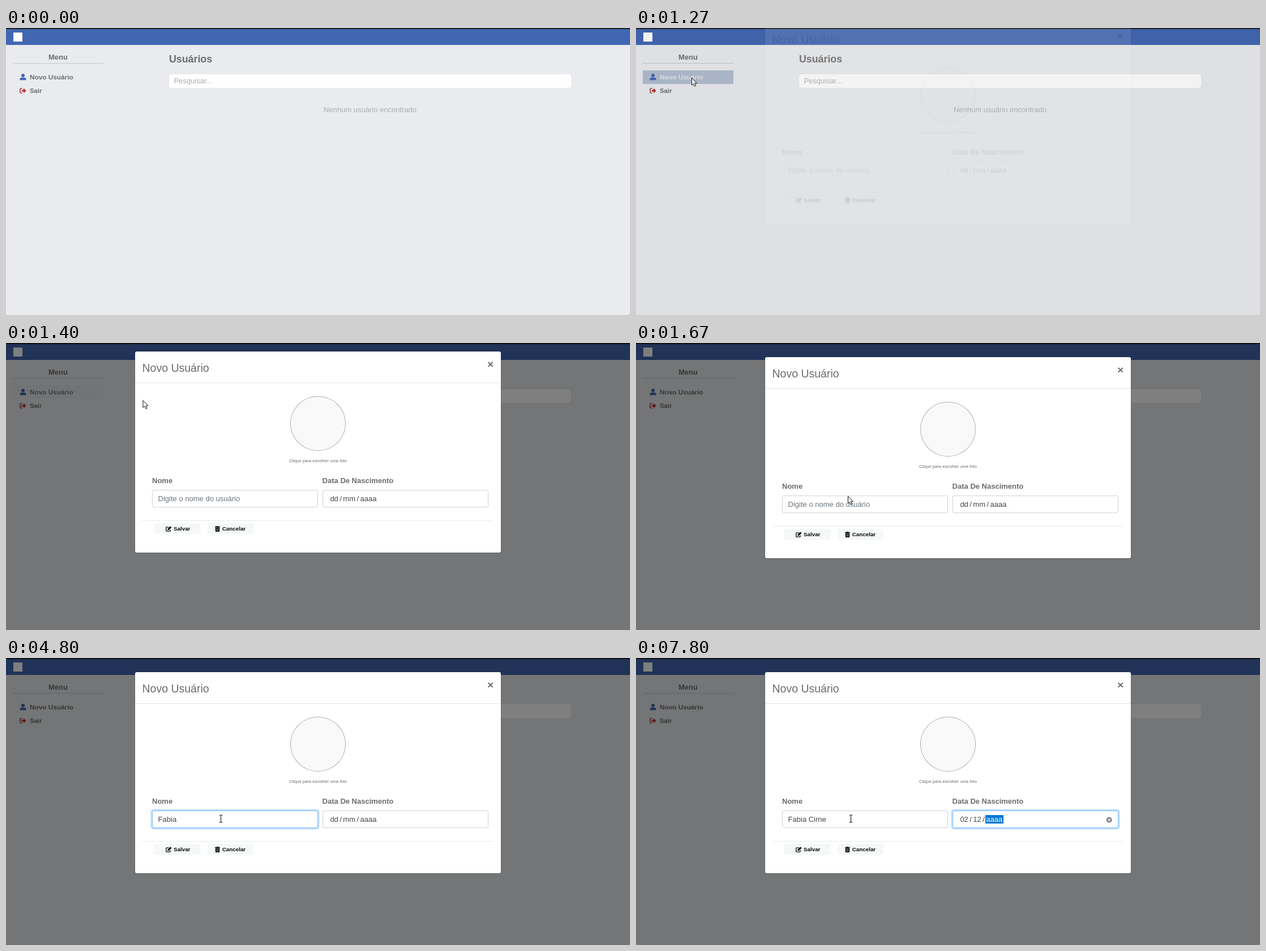
Recreate the animation shown at these times as an HTML page. Size 1102 by 508 pixels, loop 8 s.

```html
<!DOCTYPE html>
<html lang="pt-BR">
<head>
<meta charset="utf-8">
<title>Usuários</title>
<style>
  html, body { margin: 0; width: 100%; height: 100%; overflow: hidden; background: #e9ebee; }
  body { position: relative; font: 13px/16px "Liberation Sans", Arial, sans-serif; color: #6c6c6c; }
  body *, .layer { position: absolute; box-sizing: border-box; white-space: pre; }
  .layer { inset: 0; }
  b { font-weight: bold; }
  svg { overflow: visible; }
  svg * { position: static; }
  #topbar { left: 0; right: 0; top: 0; height: 30px; background: #4267b2; border-top: 2px solid #1e1f25; }
  #logo { left: 13px; top: 8px; width: 16px; height: 16px; background: #fff; }
  #menu { left: 12px; top: 44px; width: 160px; height: 19px; border-bottom: 1px solid #c6c7ca; text-align: center; }
  .row { --h: 0; left: 12px; width: 160px; height: 24px; background: rgb(166 180 204 / var(--h)); }
  .row b { left: 30px; top: 4px; font-size: 11.8px; color: color-mix(in srgb, #fff calc(var(--h) * 100%), #6c6c6c); }
  .row svg { left: 12px; top: 6px; }
  #search { left: 288px; top: 82px; width: 710px; height: 24px; border-radius: 5px; background: #fff; padding: 4px 8.4px; color: #adadad; }
  #empty { left: 288px; top: 137px; width: 710px; text-align: center; color: #adadad; }
  #backdrop { background: #000; }
  #panel { left: 228px; top: 25px; width: 646px; height: 356px; border-radius: 3px; background: #fff; box-shadow: 0 0 0 1px rgb(0 0 0 / .2); }
  .rule { height: 1px; background: #e3e5e8; }
  #photo { left: 502px; top: 104px; width: 98px; height: 97px; border: 1px solid #b0b0b0; border-radius: 50%; background: #f9f9f9; }
  .field { --g: 0; top: 270px; width: 293px; height: 31px; border-radius: 3px; background: #fff; color: #41464c;
    border: 1px solid color-mix(in srgb, #80bdff calc(var(--g) * 100%), #ced4da);
    box-shadow: 0 0 0 calc(2.56px * var(--g)) rgb(0 123 255 / calc(.25 * var(--g))); }
  .field > span { left: 9.6px; top: 7px; }
  #hint { color: #6c757d; }
  #caret { left: 100%; top: 1px; width: 1px; height: 14px; background: #333; }
  #date span { left: 10.8px; display: flex; line-height: 15px; }
  #date i { position: static; font-style: normal; padding: 0 1.6px; }
  #date u { position: static; text-decoration: none; width: 5.3px; text-align: center; }
  #date .on { background: #0078d7; color: #fff; }
  #clear { left: 270px; top: 9.5px; }
  .button { top: 329px; width: 81px; height: 19px; border-radius: 3px; background: #f5f8f8; color: #0a0a0a; }
  .button b { top: 2px; font-size: 9.8px; }
  #pointer { left: 0; top: 0; }
</style>
</head>
<body>
  <div id="topbar"></div>
  <div id="logo"></div>
  <b id="menu">Menu</b>
  <div class="row" id="newUser" style="top:75px">
    <svg width="12" height="12" fill="#4267b2"><circle cx="6" cy="3" r="3"/><path d="M.5 11.2V10Q.5 6.8 3.6 6.8H8.4Q11.5 6.8 11.5 10V11.2Z"/></svg>
    <b>Novo Usuário</b>
  </div>
  <div class="row" id="leave" style="top:99px">
    <svg width="12" height="12" fill="#b03a3a"><path d="M4.6 2H2.3Q.9 2 .9 3.4V8.6Q.9 10 2.3 10H4.6" fill="none" stroke="#b03a3a" stroke-width="1.6"/><path d="M3.6 4.4H7V1.6L11.8 6 7 10.4V7.6H3.6Z"/></svg>
    <b style="font-size:11.3px">Sair</b>
  </div>
  <b style="left:288px;top:47px;font-size:17.8px">Usuários</b>
  <div id="search">Pesquisar...</div>
  <div id="empty">Nenhum usuário encontrado</div>

  <div class="layer" id="backdrop"></div>

  <div class="layer" id="dialog">
    <div id="panel"></div>
    <div style="left:240.5px;top:46px;font-size:19.5px">Novo Usuário</div>
    <b style="left:850px;top:40px;font-size:19.2px">×</b>
    <div class="rule" style="left:228px;top:80px;width:646px"></div>
    <div id="photo"></div>
    <div style="left:228px;top:211px;width:646px;text-align:center;font-size:7.65px">Clique para escolher uma foto</div>
    <b style="left:258px;top:246px">Nome</b>
    <b style="left:558.6px;top:246px">Data De Nascimento</b>
    <div class="field" id="name" style="left:258px">
      <span id="hint">Digite o nome do usuário</span>
      <span><span id="typed" style="position:static"></span><span id="caret"></span></span>
    </div>
    <div class="field" id="date" style="left:559px">
      <span><i></i><u>/</u><i></i><u>/</u><i>aaaa</i></span>
      <svg id="clear" width="11" height="11"><circle cx="5.5" cy="5.5" r="5" fill="#858585"/><path d="M3.6 3.6L7.4 7.4M7.4 3.6L3.6 7.4" stroke="#fff" stroke-width="1.2"/></svg>
    </div>
    <div class="rule" style="left:240px;top:324px;width:621px;background:#ebebeb"></div>
    <div class="button" style="left:262px">
      <svg style="left:19.5px;top:4.5px" width="11" height="10"><path d="M5.6 1.9H1.6Q.8 1.9 .8 2.7V8.4Q.8 9.2 1.6 9.2H7.3Q8.1 9.2 8.1 8.4V6.2" fill="none" stroke="#0a0a0a" stroke-width="1.3"/><path d="M3.3 7.2L3.5 5.1 8.3.3 10.4 2.4 5.6 7Z"/></svg>
      <b style="left:34px">Salvar</b>
    </div>
    <div class="button" style="left:356px">
      <svg style="left:13px;top:4.5px" width="9" height="10"><path d="M0 .7H2.8L3.2 0H5.8L6.2.7H9V2H0ZM.6 2.6H8.4L8 10H1Z"/><path d="M2.8 4V8.8M4.5 4V8.8M6.2 4V8.8" stroke="#ddd" stroke-width=".6"/></svg>
      <b style="left:25.8px">Cancelar</b>
    </div>
  </div>

  <svg id="pointer" width="1" height="1">
    <path id="arrow" d="M.5 .5V13.2L3.3 10.6 5.4 15.2 7.6 14.2 5.6 9.8H9.4Z" fill="#fff" stroke="#111" stroke-width="1"/>
    <path id="beam" d="M-3-6.5H-1L0-5.8 1-6.5H3M0-5.8V5.8M-3 6.5H-1L0 5.8 1 6.5H3" fill="none" stroke="#222" stroke-width="1.2"/>
  </svg>

<script>
const LOOP = 8000, FPS = 15;
const CLICK = 2040, TAB = 6570, BLINK = 1072;
const DIGITS = '0212';

const $ = id => document.getElementById(id);
const parts = document.querySelectorAll('#date i');
const show = (el, on) => el.style.visibility = on ? 'visible' : 'hidden';
const ramp = (t, from, length) => Math.min(1, Math.max(0, (t - from) / length));
const easeOut = (p, power) => 1 - (1 - p) ** power;
const smooth = p => p * p * (3 - 2 * p);
const mix = (a, b, p) => a + (b - a) * p;
const curve = (a, b, c, p) => mix(mix(a, b, p), mix(b, c, p), p);

// The part of a text typed by time t, one letter per gap.
const type = (text, t, from, gap) => text.slice(0, Math.max(0, Math.floor((t - from) / gap) + 1));

function pointerAt(t) {
  const sweep = smooth(ramp(t, 0, 950));
  const dash = easeOut(ramp(t, 1328, 672), 5);
  return dash
    ? [curve(98, 283, 379.5, dash), curve(88, 40, 284.5, dash)]
    : [mix(1101, 98, sweep), mix(507, 88, sweep)];
}

function drawDialog(t) {
  const fade = ramp(t, 1259, 113);
  const drop = easeOut(ramp(t, 1246, 308), 2);
  $('backdrop').style.opacity = fade / 2;
  $('dialog').style.opacity = fade;
  $('dialog').style.transform = `translateY(${Math.round(mix(-40, 0, drop))}px)`;
}

function drawName(t) {
  const text = type('Fabia', t, 3330, 150) + type(' ', t, 4470, 150) + type('Cirne', t, 5530, 133);
  const focused = t > CLICK && t < TAB;
  $('name').style.setProperty('--g', ramp(t, CLICK, 160) - ramp(t, TAB, 230));
  $('typed').textContent = text;
  show($('hint'), !text);
  show($('caret'), focused && (t - 2600 + BLINK) % BLINK > BLINK / 2);
}

function drawDate(t) {
  // Digits come in pairs, one pair per part of the date.
  const count = [...DIGITS].filter((_, i) => t >= 7270 + 400 * (i >> 1) + 130 * (i & 1)).length;
  ['dd', 'mm'].forEach((blank, i) => {
    const digits = DIGITS.slice(0, count).slice(2 * i, 2 * i + 2);
    parts[i].textContent = digits ? digits.padStart(2, '0') : blank;
  });
  parts.forEach((part, i) => part.classList.toggle('on', t > TAB && i === count >> 1));
  $('date').style.setProperty('--g', ramp(t, TAB, 230));
  show($('clear'), count);
}

function draw(t) {
  $('newUser').style.setProperty('--h', ramp(t, 910, 200) - ramp(t, 1240, 175));
  $('leave').style.setProperty('--h', ramp(t, 760, 200) - ramp(t, 880, 200));
  drawDialog(t);
  drawName(t);
  drawDate(t);
  const [x, y] = pointerAt(t);
  $('pointer').style.transform = `translate(${x}px, ${y}px)`;
  show($('arrow'), t < 1930);
  show($('beam'), t >= 1930);
}

const start = performance.now();
function tick() {
  const elapsed = (performance.now() - start + 5) % LOOP;
  const frame = Math.floor(elapsed * FPS / 1000);
  draw(Math.round(frame * 100 / FPS) * 10);
  requestAnimationFrame(tick);
}
tick();
</script>
</body>
</html>
```
